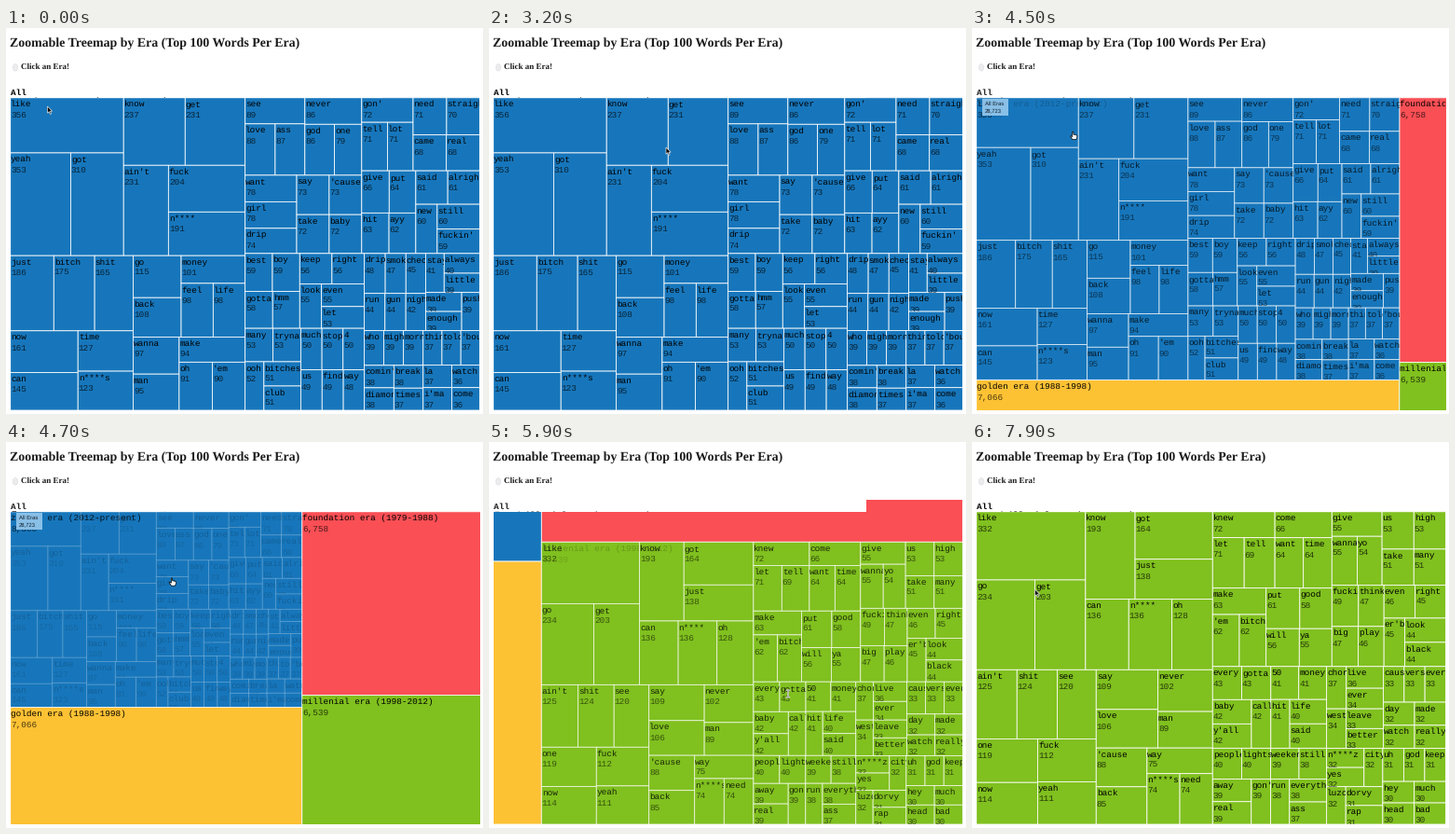
These frames come from a looping animation (512x414 px, 8 s). A matplotlib script:

```python
import numpy as np
import matplotlib.pyplot as plt
from matplotlib.animation import FuncAnimation
from matplotlib.patches import Ellipse, Polygon, Rectangle
from matplotlib.transforms import Bbox, TransformedBbox

W, H, DPI = 512, 414, 64
PT = 72 / DPI
FRAMES, STEP = 80, 100
LEFT, TOP, RIGHT, BOTTOM = 4.7, 74.8, 508.4, 410
HEAD_TOP, HEAD_RIGHT = 62, 405
MAP_W, MAP_H = RIGHT - LEFT, BOTTOM - TOP
EM = 9.35
TEXT_DX, TEXT_DY = 0.5, -0.7
ZOOM_MS, OUT_AT, IN_AT = 750, 4218, 5422

ERAS = [
    ("zoomer era (2012-present)", 8360, "#1776bb"),
    ("golden era (1988-1998)", 7066, "#fdc134"),
    ("foundation era (1979-1988)", 6758, "#f94f55"),
    ("millenial era (1998-2012)", 6539, "#80c01f"),
]

ZOOMER = """
like 356 yeah 353 got 310 know 237 get 231 ain't 231 fuck 204 n**** 191
just 186 bitch 175 shit 165 now 161 can 145 time 127 n****s 123 go 115
back 108 money 101 feel 98 life 98 wanna 97 man 95 make 94 oh 91 'em 90
see 89 love 88 ass 87 never 86 god 86 one 79 want 78 girl 78 drip 74
say 73 'cause 73 take 72 baby 72 gon' 72 tell 71 lot 71 need 71
straight 70 came 68 real 68 give 66 put 64 hit 63 ayy 62 said 61
alright 61 new 60 still 60 fuckin' 59 best 59 boy 59 gotta 58 hmm 57
keep 56 right 56 look 55 even 55 let 53 many 53 tryna 53 ooh 52
bitches 51 club 51 much 50 stop 50 4 50 us 49 find 49 way 48 drip 48
smoke 47 check 45 run 44 gun 44 night 42 stay 41 always 40 little 39
made 39 enough 39 push 39 who 39 might 39 mornin' 39 comin' 38
diamonds 38 break 38 times 37 thing 37 told 37 'bout 37 la 37 i'ma 37
watch 36 come 36
"""

MILLENIAL = """
like 332 go 234 get 203 know 193 got 164 just 138 can 136 n**** 136
oh 128 ain't 125 shit 124 see 120 one 119 now 114 fuck 112 yeah 111
say 109 love 106 never 102 man 89 'cause 88 back 85 way 75 n****s 74
need 74 knew 72 let 71 tell 69 come 66 want 64 time 64 make 63 'em 62
bitch 62 put 61 good 58 will 56 ya 55 give 55 wanna 55 yo 54 us 53
high 53 take 51 many 51 fuckin' 49 think 47 big 47 play 46 even 46
right 45 er'body 45 look 44 black 44 every 43 gotta 43 baby 42
y'all 42 call 42 50 41 money 41 hit 41 life 40 said 40 people 40
lights 40 away 39 real 39 gon' 39 weekend 39 still 38 run 38
everything 38 ass 37 chorus 37 live 36 ever 34 west 34 leave 33
better 33 cause 33 verse 33 everybody 33 day 32 watch 32 made 32
really 32 n****z 32 yes 32 city 32 luzob 32 dorvy 31 rap 31 uh 31
god 31 keep 31 hey 30 head 30 much 30 bad 30
"""


def parse(text):
    parts = text.split()
    return parts[::2], [int(v) for v in parts[1::2]]


def binary_treemap(values):
    """Split a sorted list in halves of near equal sum; unit rectangles."""
    sums = np.concatenate([[0], np.cumsum(values)])
    out = np.zeros((len(values), 4))

    def split(i, j, x0, y0, x1, y1):
        if j - i == 1:
            out[i] = x0 / MAP_W, y0 / MAP_H, x1 / MAP_W, y1 / MAP_H
            return
        mid = (sums[i] + sums[j]) / 2
        # on a tie the first half takes the extra item
        k = min(range(i + 1, j), key=lambda n: (abs(sums[n] - mid), -n))
        part = (sums[k] - sums[i]) / (sums[j] - sums[i])
        if x1 - x0 > y1 - y0:
            xk = x0 + (x1 - x0) * part
            split(i, k, x0, y0, xk, y1)
            split(k, j, xk, y0, x1, y1)
        else:
            yk = y0 + (y1 - y0) * part
            split(i, k, x0, y0, x1, yk)
            split(k, j, x0, yk, x1, y1)

    split(0, len(values), 0, 0, MAP_W, MAP_H)
    return out


def ease(u):
    u = min(max(u, 0), 1)
    return 4 * u**3 if u < 0.5 else 1 - (2 - 2 * u) ** 3 / 2


plt.rcParams["text.hinting"] = "none"
fig = plt.figure(figsize=(W / DPI, H / DPI), dpi=DPI, facecolor="white")
ax = fig.add_axes([0, 0, 1, 1])
ax.set_xlim(0, W)
ax.set_ylim(H, 0)
ax.axis("off")


def clip_box(x0, y0, x1, y1):
    return TransformedBbox(Bbox.from_extents(x0, y0, x1, y1), ax.transData)


def label(x, y, s, px, font="Liberation Mono", **kw):
    kw = {"color": "black", "va": "baseline", "ha": "left", **kw}
    return ax.text(x, y, s, fontsize=px * PT, family=font, parse_math=False, **kw)


STAGE = clip_box(LEFT, HEAD_TOP, RIGHT + 0.4, BOTTOM + 0.2)


class Group:
    """Cells plus the white header strip, faded and moved together."""

    def __init__(self, names, values, colors, path, z):
        self.cells = []
        for name, value, color in zip(names, values, colors):
            box = Rectangle((0, 0), 1, 1, fc=color, ec="white", lw=0.8 * PT,
                            snap=False, zorder=z)
            ax.add_patch(box)
            box.set_clip_box(STAGE)
            texts = [
                (label(0, 0, name, EM, zorder=z + 0.1, clip_on=True), 1.1, 1),
                (label(0, 0, f"{value:,}", EM, zorder=z + 0.1, clip_on=True), 2.3, 0.7),
            ]
            self.cells.append((box, texts))
        strip = Rectangle((LEFT, HEAD_TOP), HEAD_RIGHT - LEFT, TOP - HEAD_TOP,
                          fc="white", lw=0, zorder=z + 0.2)
        ax.add_patch(strip)
        self.head = [strip]
        for s, em in (("All", 1.1), (path, 2.0)):
            t = label(LEFT + TEXT_DX, HEAD_TOP + em * EM, s, EM, weight="bold",
                      zorder=z + 0.3, clip_on=True)
            t.set_clip_box(clip_box(LEFT, HEAD_TOP, HEAD_RIGHT, TOP))
            self.head.append(t)

    def place(self, rects, alpha):
        shown = alpha > 0
        for art in self.head:
            art.set_visible(shown)
            art.set_alpha(alpha)
        for (box, texts), (u0, v0, u1, v1) in zip(self.cells, rects):
            x0, x1 = LEFT + u0 * MAP_W, LEFT + u1 * MAP_W
            y0, y1 = TOP + v0 * MAP_H, TOP + v1 * MAP_H
            box.set_bounds(x0, y0, x1 - x0, y1 - y0)
            box.set_alpha(alpha)
            cx0, cx1 = max(x0, LEFT), min(x1, RIGHT)
            cy0, cy1 = max(y0, HEAD_TOP), min(y1, BOTTOM)
            inside = shown and cx1 - cx0 > 1 and cy1 - cy0 > 1
            box.set_visible(inside)
            for text, em, strength in texts:
                text.set_visible(inside)
                if inside:
                    text.set_position((x0 + TEXT_DX, y0 + em * EM + TEXT_DY))
                    text.set_alpha(alpha * strength)
                    text.set_clip_box(clip_box(cx0, cy0, cx1, cy1))


era_names, era_values, era_colors = zip(*ERAS)
era_rects = binary_treemap(era_values)
overview = Group(era_names, era_values, era_colors, "Eras", 1)


def word_group(index, text):
    names, values = parse(text)
    group = Group(names, values, [era_colors[index]] * len(names),
                  "Eras/" + era_names[index], 2)
    return group, binary_treemap(values), era_rects[index]


zoomer = word_group(0, ZOOMER)
millenial = word_group(3, MILLENIAL)

# Page heading
label(4.4, 20.3, "Zoomable Treemap by Era (Top 100 Words Per Era)", 13.92,
      "Liberation Serif", weight="bold", color="#1b1b1b")
label(15.8, 44.2, "Click an Era!", 9, "Liberation Serif", weight="bold", color="#1b1b1b")
ax.add_patch(Ellipse((10, 42.3), 5.4, 7.6, fc="#ececef", ec="#d8d8dc", lw=0.5))


class Tooltip:
    def __init__(self, x, y, w, h, lines, start, end):
        self.span = start, end
        box = Rectangle((x, y), w, h, fc="#93c6ec", alpha=0.93, lw=0, zorder=5)
        ax.add_patch(box)
        self.arts = [box] + [
            label(x + 3, y + 7.2 + 7 * i, s, 5.9, "Liberation Sans", color="#12202c", zorder=6)
            for i, s in enumerate(lines)
        ]

    def show(self, ms):
        for art in self.arts:
            art.set_visible(self.span[0] <= ms < self.span[1])


tips = [
    Tooltip(45, 94, 112, 17, ["All Eras/zoomer era (2012-present)/like", "356"], 1200, 2200),
    Tooltip(11, 76, 27.5, 17.5, ["All Eras", "28,723"], 4400, 4900),
]

ARROW = np.array([(0, 0), (0, 7.2), (1.7, 5.7), (2.9, 8.4), (4.1, 7.9), (2.9, 5.2), (5.2, 5.2)])
HAND = np.array([(-1.6, -4), (-0.5, -4), (-0.4, -1.2), (2.6, -0.7), (3.6, 0.2),
                 (3.3, 2.4), (2.4, 4.2), (-1.5, 4.2), (-3.8, 0.8), (-3, 0.3), (-1.7, 1.3)])
BEAM = np.array([(-2, -4.2), (2, -4.2), (2, -3.5), (0.4, -3.3), (0.4, 3.3), (2, 3.5),
                 (2, 4.2), (-2, 4.2), (-2, 3.5), (-0.4, 3.3), (-0.4, -3.3), (-2, -3.5)])


def pointer(shape, fc, ec):
    return shape, ax.add_patch(Polygon(shape, fc=fc, ec=ec, lw=0.7 * PT, zorder=8))


pointers = {
    "arrow": pointer(ARROW, "black", "#e8e8e8"),
    "hand": pointer(HAND, "white", "black"),
    "beam": pointer(BEAM, "#222222", "#dddddd"),
}

# time, x, y of the pointer
TRACK = [
    (0, 44.5, 84), (1600, 44.5, 84), (2100, 155, 100.5), (2700, 190, 128),
    (3200, 190, 128), (3950, 12, 67), (4250, 12, 67), (4700, 179, 150),
    (5250, 321, 270), (6150, 321, 270), (6700, 253, 222), (7900, 67.5, 158),
]


def pointer_pos(ms):
    for (t0, *a), (t1, *b) in zip(TRACK, TRACK[1:]):
        if ms <= t1:
            u = (ms - t0) / (t1 - t0)
            return np.array(a) + (np.array(b) - a) * u * u * (3 - 2 * u)
    return np.array(TRACK[-1][1:])


def pointer_kind(ms):
    if 3900 <= ms < 4300 or 5500 <= ms < 6200:
        return "beam"
    return "hand" if 4300 <= ms < 5500 else "arrow"


def update(i):
    ms = i * STEP
    first = ms < (OUT_AT + ZOOM_MS + IN_AT) / 2
    k = ease((ms - OUT_AT) / ZOOM_MS) if first else 1 - ease((ms - IN_AT) / ZOOM_MS)
    active, idle = (zoomer, millenial) if first else (millenial, zoomer)

    group, cells, era = active
    origin, size = np.tile(era[:2], 2), np.tile(era[2:] - era[:2], 2)
    group.place(cells + (origin + cells * size - cells) * k, 1 - k)
    idle[0].place(idle[1], 0)

    near = (era_rects - origin) / size
    overview.place(near + (era_rects - near) * k, 1 if k > 0 else 0)

    for tip in tips:
        tip.show(ms)
    for kind, (shape, patch) in pointers.items():
        patch.set_visible(kind == pointer_kind(ms))
        patch.set_xy(shape + pointer_pos(ms))
    return []


anim = FuncAnimation(fig, update, frames=FRAMES, interval=STEP, repeat=True,
                     repeat_delay=0, blit=False)
plt.show()
```
